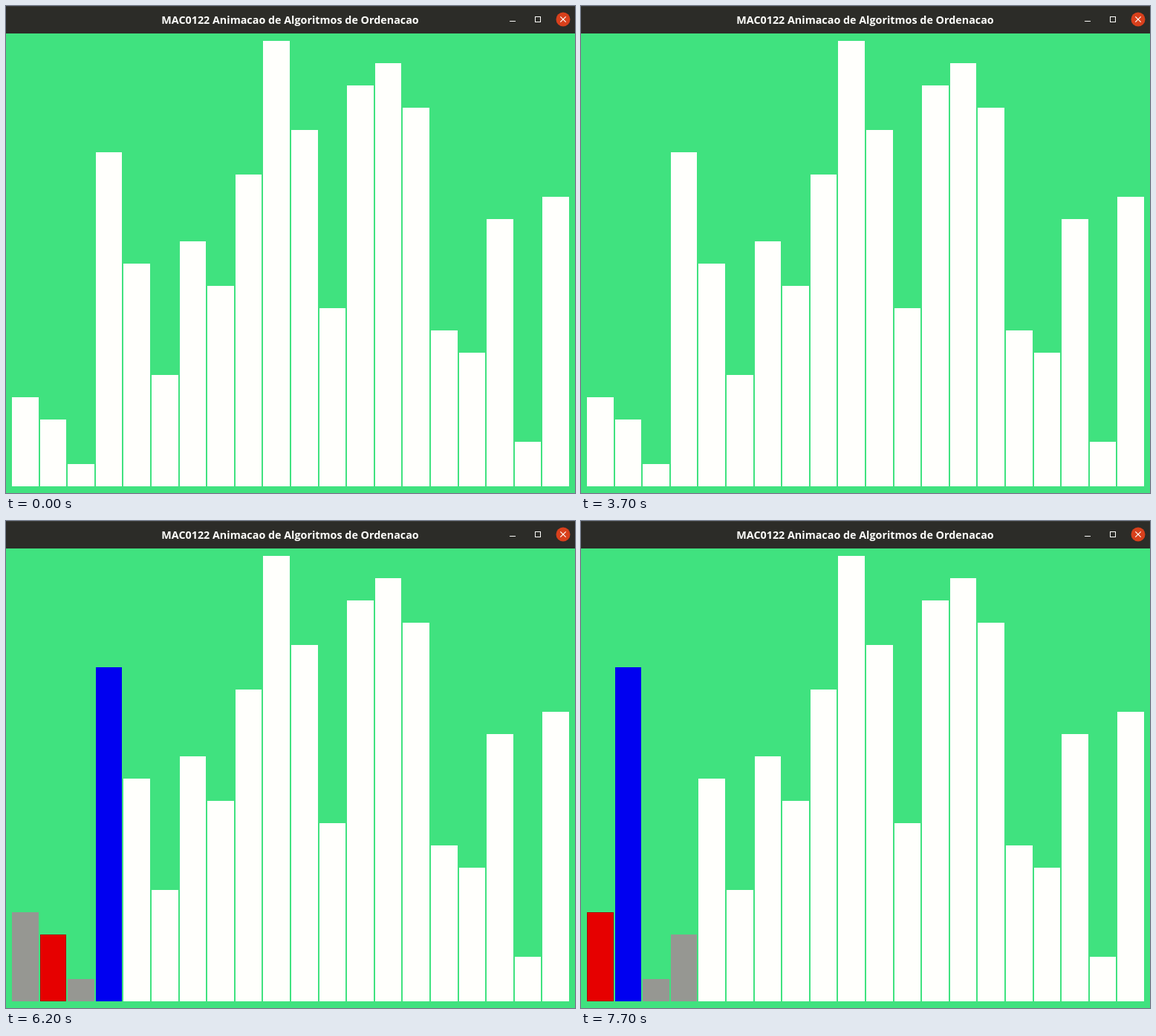
An HTML page that plays this animation: 766 px wide and 656 px high, repeating every 8 s.

```html
<!DOCTYPE html>
<html lang="pt">
<head>
<meta charset="utf-8">
<title>Ordenacao</title>
<style>
  html, body { margin: 0; width: 100%; height: 100%; overflow: hidden; background: #40e27f; }
  svg { display: block; }
  rect { shape-rendering: crispEdges; }
  text { font: bold 14.33px "Open Sans", "Noto Sans", sans-serif; fill: #fffffc; text-anchor: middle; }
</style>
</head>
<body>
<svg width="766" height="656">
  <rect width="766" height="656" fill="#40e27f"/>
  <rect width="766" height="37" fill="#2c2c28"/>
  <rect width="766" height="1" fill="#393935"/>
  <text x="382.5" y="24">MAC0122 Animacao de Algoritmos de Ordenacao</text>
  <rect x="678" y="20" width="8" height="1" fill="#fffffc"/>
  <rect x="712.5" y="14.5" width="7" height="7" fill="none" stroke="#fffffc"/>
  <circle cx="750" cy="18" r="9.5" fill="#d8401c"/>
  <path d="M746.3 14.3l7.4 7.4m0-7.4l-7.4 7.4" stroke="#fffffc" stroke-width="1.2"/>
  <g id="bars"></g>
</svg>
<script>
const WHITE = '#fffffc', GRAY = '#969792', BLUE = '#0000f0', RED = '#e60000', EDGE = '#b00000';
const UNIT = 30, BASE = 647, PITCH = 37.6, LOOP = 8000;
const values = [4, 3, 1, 15, 10, 5, 11, 9, 14, 20, 16, 8, 18, 19, 17, 7, 6, 12, 2, 13];

// Record every step of building a max-heap by inserting one bar at a time.
function heapSteps(count) {
  const a = [...values], steps = [];
  const record = (size, blue, red) => steps.push({
    heights: [...a],
    colors: a.map((_, i) => i === blue ? BLUE : i === red ? RED : i < size ? GRAY : WHITE)
  });
  record(0);
  for (let size = 1; size <= count; size++) {
    let child = size - 1;
    record(size);
    if (!child) record(size, 0);
    while (child > 0) {
      const parent = (child - 1) >> 1;
      record(size, child, parent);
      if (a[child] <= a[parent]) break;
      [a[child], a[parent]] = [a[parent], a[child]];
      record(size, parent, child);
      record(size);
      child = parent;
    }
    record(0);
  }
  return steps;
}

const steps = heapSteps(4);
const group = document.getElementById('bars');

function box(x, y, w, h, fill) {
  return `<rect x="${x}" y="${y}" width="${w}" height="${h}" fill="${fill}"/>`;
}

function drawStep({ heights, colors }) {
  group.innerHTML = heights.map((v, i) => {
    const x = Math.round(8 + PITCH * i), w = Math.round(43.6 + PITCH * i) - x;
    const h = v * UNIT, y = BASE - h, color = colors[i];
    return color === RED
      ? box(x, y, w, h, EDGE) + box(x + 1, y + 1, w - 2, h - 2, RED)
      : box(x, y, w, h, color);
  }).join('');
}

function stepAt(t) {
  if (t < 1100) return 0;
  return t < 1700 ? 1 : 2 + Math.floor((t - 1700) / 500);
}

let shown = -1;
const start = performance.now();
function tick() {
  const step = stepAt((performance.now() - start) % LOOP);
  if (step !== shown) drawStep(steps[shown = step]);
  requestAnimationFrame(tick);
}
tick();
</script>
</body>
</html>
```
